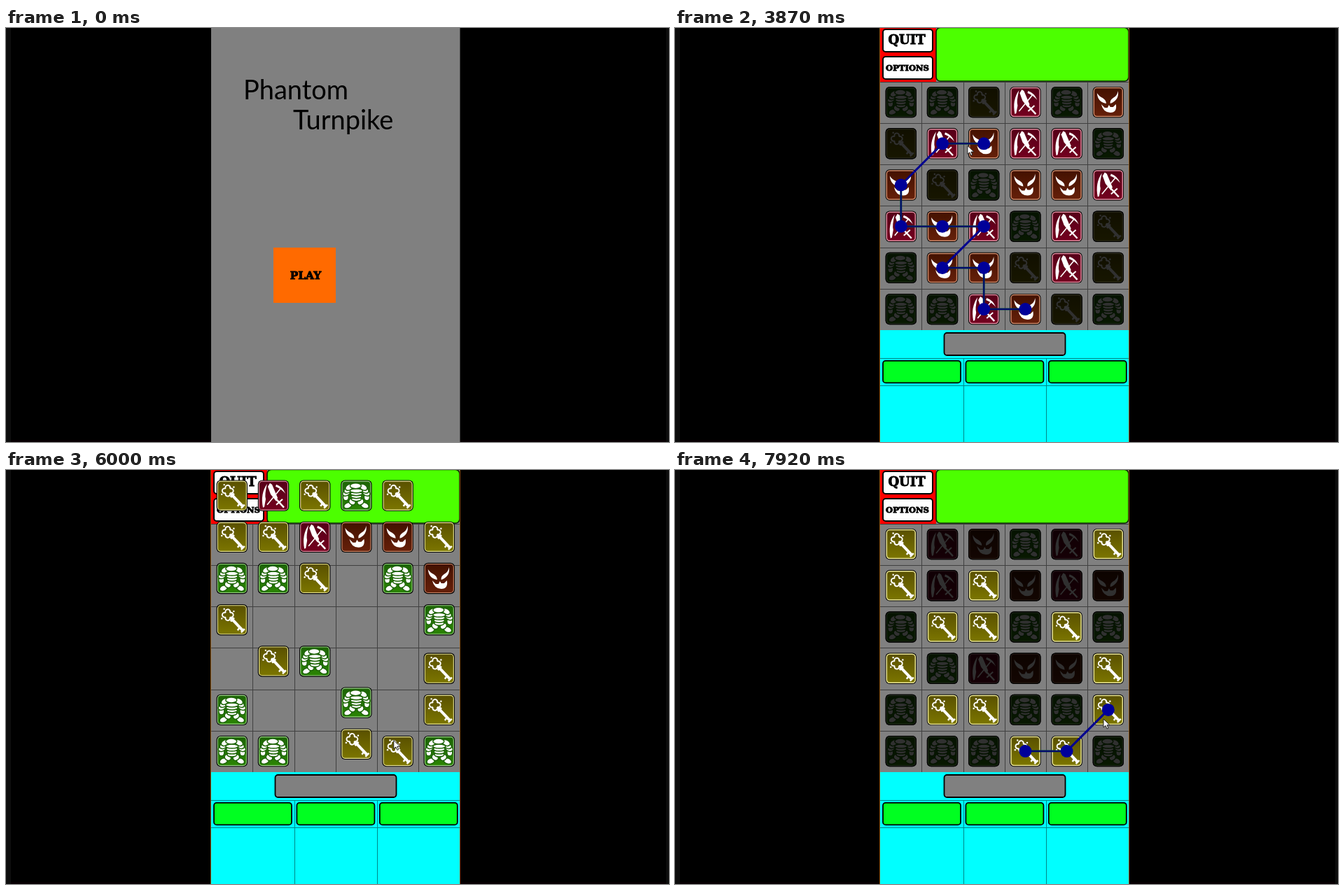
An HTML page with a canvas for the animation above (8000 ms loop, 947 by 592 pixels).

```html
<!DOCTYPE html>
<html lang="en">
<head>
<meta charset="utf-8">
<title>Tile game</title>
<style>
  html, body { margin: 0; width: 100%; height: 100%; overflow: hidden; background: #000; }
  canvas { display: block; }
</style>
</head>
<body>
<canvas id="stage" width="947" height="592"></canvas>
<script>
const ctx = document.getElementById('stage').getContext('2d');
const LOOP = 8000, CELL = 59.2, LEFT = 293.2, TOP = 76.8;
const DROP = 5860, FALL_FROM = 5840, FALL_SPEED = 0.304, LANDED = 6640, UNDO = 7860;

const cx = c => LEFT + (c + 0.5) * CELL;
const cy = r => TOP + (r + 0.5) * CELL - 0.3;

// Tiles by row, and the refill of each column from the top
const START = ['ggmrgd', 'mrdrrg', 'dmgddr', 'rdrgrm', 'gddmrm', 'ggrdmg'];
const REFILL = ['mm', 'rrm', 'dmmr', 'gdgd', 'rrmd', 'm'];

// Each cell is a "column row" pair, reached at a steady pace
const chain = (cells, from, step) =>
  cells.split(' ').map(([c, r], i) => ({ c: +c, r: +r, t: from + i * step }));
const FIRST = chain('35 25 24 14 23 13 03 02 11 21 30 31 32 41 42 52 43 44', 1670, 236);
const SECOND = chain('35 45 54 53', 6950, 137);

// Every tile after the first chain is gone: kind, column, start row, end row
const FALLERS = REFILL.flatMap((fresh, c) => {
  const old = START.map((row, r) => ({ kind: row[c], c, from: r }))
    .filter(({ from }) => !FIRST.some(n => n.c === c && n.r === from));
  const added = [...fresh].map((kind, i) => ({ kind, c, from: i - fresh.length }));
  return [...added, ...old].map((tile, to) => ({ ...tile, to }));
});

// Pointer keys are [time, x, y]; it trails the selected cells
const trail = (nodes, lag) => nodes.map(n => [n.t + lag, cx(n.c) - 5, cy(n.r) + 3]);
const POINTER = [
  [350, 419, 343], [680, 419, 343], [880, 433, 351], [1100, 460, 366],
  [1320, 441, 389], [1400, 441, 389],
  ...trail(FIRST, 150),
  [5860, 557, 386], [6390, 545, 388], [6740, 517, 396],
  ...trail(SECOND, 20),
  [7790, 613, 287], [7920, 612, 356]
];

// Tile palette: top, bottom, rim
const SKIN = {
  g: ['#1d6406', '#2b8503', '#9fd98c'],
  m: ['#595000', '#7c7600', '#f0eb9a'],
  r: ['#560018', '#74001f', '#e58fa2'],
  d: ['#431100', '#66200a', '#cf8a6a']
};

function rect(x, y, w, h, color) {
  ctx.fillStyle = color;
  ctx.fillRect(x, y, w, h);
}

function box(x, y, w, h, r, fill, edge, width) {
  ctx.beginPath();
  ctx.roundRect(x, y, w, h, r);
  ctx.fillStyle = fill;
  ctx.fill();
  if (edge) {
    ctx.strokeStyle = edge;
    ctx.lineWidth = width;
    ctx.stroke();
  }
}

function line(x1, y1, x2, y2, width, color) {
  ctx.strokeStyle = color;
  ctx.lineWidth = width;
  ctx.beginPath();
  ctx.moveTo(x1, y1);
  ctx.lineTo(x2, y2);
  ctx.stroke();
}

function dot(x, y, r, color) {
  ctx.fillStyle = color;
  ctx.beginPath();
  ctx.arc(x, y, r, 0, 7);
  ctx.fill();
}

function plate(x, y, rx, ry, tilt = 0) {
  ctx.beginPath();
  ctx.ellipse(x, y, rx, ry, tilt, 0, 7);
  ctx.fill();
  ctx.stroke();
}

function text(str, x, y, font, align = 'left') {
  ctx.font = font;
  ctx.textAlign = align;
  ctx.fillStyle = '#000';
  ctx.fillText(str, x, y);
}

function slab(str, x, y, size) {
  text(str, x, y, `bold ${size}px "DejaVu Serif", serif`, 'center');
  ctx.strokeStyle = '#000';
  ctx.lineWidth = 0.9;
  ctx.strokeText(str, x, y);
}

const HORNS = new Path2D(
  'M-16-13Q-15 0-3 2Q-3-3-8-6Q-13-8-16-13Z M14-16Q16-3 3 2Q2-3 7-6Q13-9 14-16Z');
const JAW = new Path2D('M-10 3L-5 8L-1 8L1 4L3 7L7 7L11 3Q13 15 3 15Q-7 15-10 3Z');
const SICKLE = new Path2D('M-15 17Q-19-3-9-17Q-13-1-11 5L-13 16Z M4-16Q13-13 17-3Q11-10 3-13Z');
const DAGGER = new Path2D('M-8-13L-5-18L-2-16L6 3L4 8L-4-2Z');
const ARROW = new Path2D('M0 0V12L3 9.5L5 14L7 13L5 8.8H9Z');

const ICON = {
  d() {
    ctx.fill(HORNS);
    ctx.fill(JAW);
  },
  r() {
    ctx.fill(SICKLE);
    ctx.fill(DAGGER);
    line(10, -10, -9, 13, 1.6, '#fff');
    line(2, 3, 15, 17, 2.4, '#fff');
    line(4, 13, 13, 5, 2, '#fff');
  },
  g() {
    ctx.strokeStyle = SKIN.g[0];
    ctx.lineWidth = 1.5;
    for (const side of [-1, 1]) {
      plate(side * 12, 14, 6, 4, side * 0.4);
      plate(side * 6, 9, 5, 4, side * -0.6);
      plate(side * 15, 2, 4, 5);
      for (let i = 0; i < 3; i++) plate(side * (14 - i * 2), -4 - i * 4, 6, 4, side * 0.5);
    }
    for (let i = 0; i < 4; i++) plate(0, 5 - i * 4, 7 + i * 0.7, 3);
    plate(-1, -14, 8, 4);
  },
  m() {
    line(-2, -3, 15, 15, 4, '#fff');
    line(8, 15, 11, 11, 2.5, '#fff');
    line(13, 18, 18, 13, 2.5, '#fff');
    line(-2, 2, 3, -3, 3, '#fff');
    for (let i = 0; i < 4; i++) {
      const a = i * Math.PI / 2, x = -6 + 4.5 * Math.cos(a), y = -7 + 4.5 * Math.sin(a);
      ctx.lineWidth = 2;
      ctx.beginPath();
      ctx.arc(x, y, 3.4, a - 2, a + 2);
      ctx.stroke();
      dot(-6 + 10 * Math.cos(a + 2.6), -7 + 10 * Math.sin(a + 2.6), 1.2, '#fff');
    }
  }
};

function tile(kind, x, y, mode) {
  const [top, bottom, rim] = SKIN[kind];
  const fill = ctx.createLinearGradient(0, -21, 0, 21);
  fill.addColorStop(0, top);
  fill.addColorStop(1, bottom);
  ctx.save();
  ctx.translate(x, y);
  box(-22.2, -22.2, 44.4, 44.4, 6, '#000');
  box(-20.5, -20.5, 41, 41, 4.5, fill, rim, mode === 'lit' ? 1.5 : 1.1);
  ctx.fillStyle = ctx.strokeStyle = '#fff';
  ICON[kind]();
  if (mode === 'dim') box(-22.2, -22.2, 44.4, 44.4, 6, 'rgba(0,0,0,.81)');
  ctx.restore();
}

function backdrop() {
  rect(0, 0, 947, 592, '#000');
  rect(0, 0, 7, 592, '#0d0d0d');
  rect(943, 0, 4, 592, '#0d0d0d');
  rect(7, 589, 936, 3, '#080003');
}

function title() {
  const font = '38px Carlito, Lato, sans-serif';
  rect(293, 0, 355.5, 592, '#808080');
  text('Phantom', 339, 102, font);
  text('Turnpike', 410, 145, font);
  rect(382, 314, 89, 79, '#ff6a00');
  slab('PLAY', 428, 359, 15.4);
}

function panel() {
  rect(293, 0, 356, 592, '#808080');
  rect(293, 0, 80, 77, '#f00');
  box(297, 2, 71, 32, 4, '#fff', '#000', 2);
  box(297, 41, 71, 32, 4, '#fff', '#000', 2);
  slab('QUIT', 331, 23, 18);
  slab('OPTIONS', 332, 61, 11.6);
  box(373, -0.5, 275, 76.5, 6, '#4cff00', '#0a2400', 1.7);

  for (let i = 0; i < 6; i++) {
    rect(293, Math.round(TOP + i * CELL), 356, 1, '#404040');
    if (i) rect(Math.round(LEFT + i * CELL), 77, 1, 355, '#404040');
  }

  rect(293, 432, 356, 160, '#0ff');
  for (const y of [472, 511]) rect(293, y, 356, 1, '#088');
  for (const x of [412, 530]) rect(x, 472, 1, 120, '#088');
  box(384.5, 436, 173, 32, 4, '#808080', '#000', 1.8);
  for (let i = 0; i < 3; i++) {
    box(297 + i * 2 * CELL, 475.8, 111, 31.6, 4, '#00ff21', '#000', 1.8);
  }
  for (const x of [292, 648]) rect(x, 0, 1, 592, '#8a5210');
}

function links(nodes) {
  nodes.slice(1).forEach((b, i) => {
    const a = nodes[i], ends = [cx(a.c), cy(a.r), cx(b.c), cy(b.r)];
    const slanted = a.c !== b.c && a.r !== b.r;
    line(...ends, 3, slanted ? '#00008f' : '#07454f');
    if (!slanted) line(...ends, 1.6, '#000070');
  });
  for (const n of nodes) dot(cx(n.c), cy(n.r), 9, '#000099');
}

function board(t) {
  const dropped = t >= DROP, falling = dropped && t < LANDED;
  const shift = dropped ? (t - FALL_FROM) * FALL_SPEED : 0;
  const nodes = (dropped ? SECOND : FIRST).filter(n => n.t <= t);
  if (t >= UNDO) nodes.pop();

  const lit = dropped ? 'm' : 'rd';
  const mode = kind => nodes.length && !falling ? (lit.includes(kind) ? 'lit' : 'dim') : '';
  if (dropped) {
    for (const { kind, c, from, to } of FALLERS) {
      tile(kind, cx(c), Math.min(cy(from) + shift, cy(to)), mode(kind));
    }
  } else {
    START.forEach((row, r) =>
      [...row].forEach((kind, c) => tile(kind, cx(c), cy(r), mode(kind))));
  }
  links(nodes);
}

function pointer(t) {
  const next = POINTER.findIndex(p => p[0] > t);
  const b = POINTER.at(next), a = next < 0 ? b : POINTER[next - 1];
  const k = a === b ? 0 : (t - a[0]) / (b[0] - a[0]);
  ctx.save();
  ctx.translate(a[1] + (b[1] - a[1]) * k, a[2] + (b[2] - a[2]) * k);
  ctx.fillStyle = '#fff';
  ctx.strokeStyle = '#222';
  ctx.lineWidth = 1;
  ctx.fill(ARROW);
  ctx.stroke(ARROW);
  ctx.restore();
}

function draw(t) {
  backdrop();
  if (t < 350) title();
  if (t >= 60) {
    const left = Math.max(0, 1 - (t - 60) / 290);
    ctx.save();
    ctx.translate(132 * left * left, 0);
    panel();
    board(t);
    ctx.restore();
  }
  if (t >= 350) pointer(t);
}

const begin = performance.now();
function frame() {
  draw((performance.now() - begin) % LOOP);
  requestAnimationFrame(frame);
}
frame();
</script>
</body>
</html>
```
